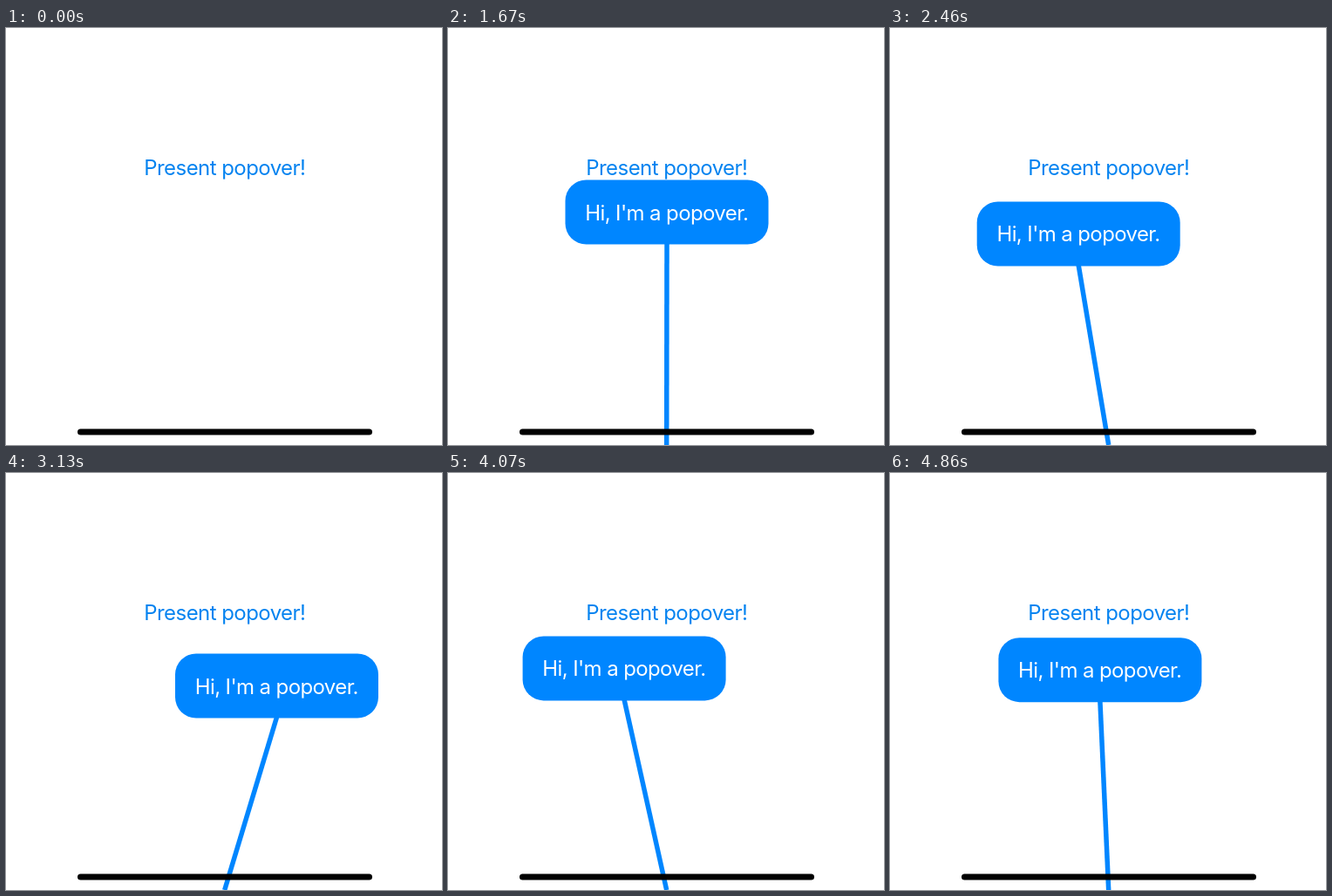
An HTML page for the animation above (4.93 s loop, 500x479 px).

```html
<!DOCTYPE html>
<html lang="en">
<head>
<meta charset="utf-8">
<title>Draggable popover</title>
<style>
  html, body { margin: 0; width: 100%; height: 100%; overflow: hidden; background: #fff; }
  svg { display: block; width: 500px; height: 479px; }
  text { font: 24px Inter, Roboto, sans-serif; text-anchor: middle; }
</style>
</head>
<body>
<svg viewBox="0 0 500 479">
  <text id="label" x="250.8" y="168.7" fill="#0483f0" letter-spacing="-.56">Present popover!</text>
  <g id="popover">
    <line id="tether" x2="250.7" y2="479" stroke="#0086ff" stroke-width="5.5"/>
    <g id="bubble">
      <rect width="233" height="74" rx="24" fill="#0086ff"/>
      <text x="116.3" y="46" fill="#fff" letter-spacing="-.61">Hi, I'm a popover.</text>
    </g>
  </g>
  <rect x="82" y="460.4" width="338" height="7" rx="3.5"/>
</svg>
<script>
const LOOP = 4930, STEP = 200 / 3;
const $ = id => document.getElementById(id);
const label = $('label'), popover = $('popover'), tether = $('tether'), bubble = $('bubble');

// Turning points of the drag, as [step, position]
const left = [[25, 134.5], [27, 184], [29, 108.3], [31, 85], [36, 85], [37, 99.7],
  [47, 194], [49, 198], [61, 85.6], [63, 79.5], [73, 124.4]];
const top_ = [[25, 174.5], [27, 157], [29, 194.3], [31, 207.5], [36, 207.5], [40, 156],
  [47, 207.5], [54, 160], [61, 187.4], [65, 168], [69, 191], [73, 189.2]];

const clamp = v => Math.min(1, Math.max(0, v));
const ease = v => v * v * (3 - 2 * v);

// Smooth curve through the points that never overshoots them
function track(points) {
  const last = points.length - 1;
  const rate = i => (points[i + 1][1] - points[i][1]) / (points[i + 1][0] - points[i][0]);
  const slope = i => {
    if (i === 0 || i === last) return 0;
    const a = rate(i - 1), b = rate(i);
    return a * b > 0 ? 2 * a * b / (a + b) : 0;
  };
  return n => {
    if (n <= points[0][0]) return points[0][1];
    if (n >= points[last][0]) return points[last][1];
    const i = points.findIndex(p => p[0] > n) - 1;
    const [n0, v0] = points[i], [n1, v1] = points[i + 1];
    const d = n1 - n0, k = (n - n0) / d;
    return v0 + (v1 - v0) * ease(k)
      + d * k * (1 - k) * (slope(i) * (1 - k) - slope(i + 1) * k);
  };
}
const leftAt = track(left), topAt = track(top_);

function draw(now) {
  // Motion advances at 15 steps per second
  const n = Math.floor((now % LOOP + 10) / STEP);
  const x = leftAt(n), y = topAt(n);
  bubble.setAttribute('transform', `translate(${x} ${y})`);
  tether.setAttribute('x1', x + 116.5);
  tether.setAttribute('y1', y + 73);
  popover.setAttribute('opacity', ease(clamp((n - 3.5) / 6)));
  label.setAttribute('opacity', n < 3 ? 1 : .4 + .6 * clamp((n - 4) / 4));
  requestAnimationFrame(draw);
}
requestAnimationFrame(draw);
</script>
</body>
</html>
```
